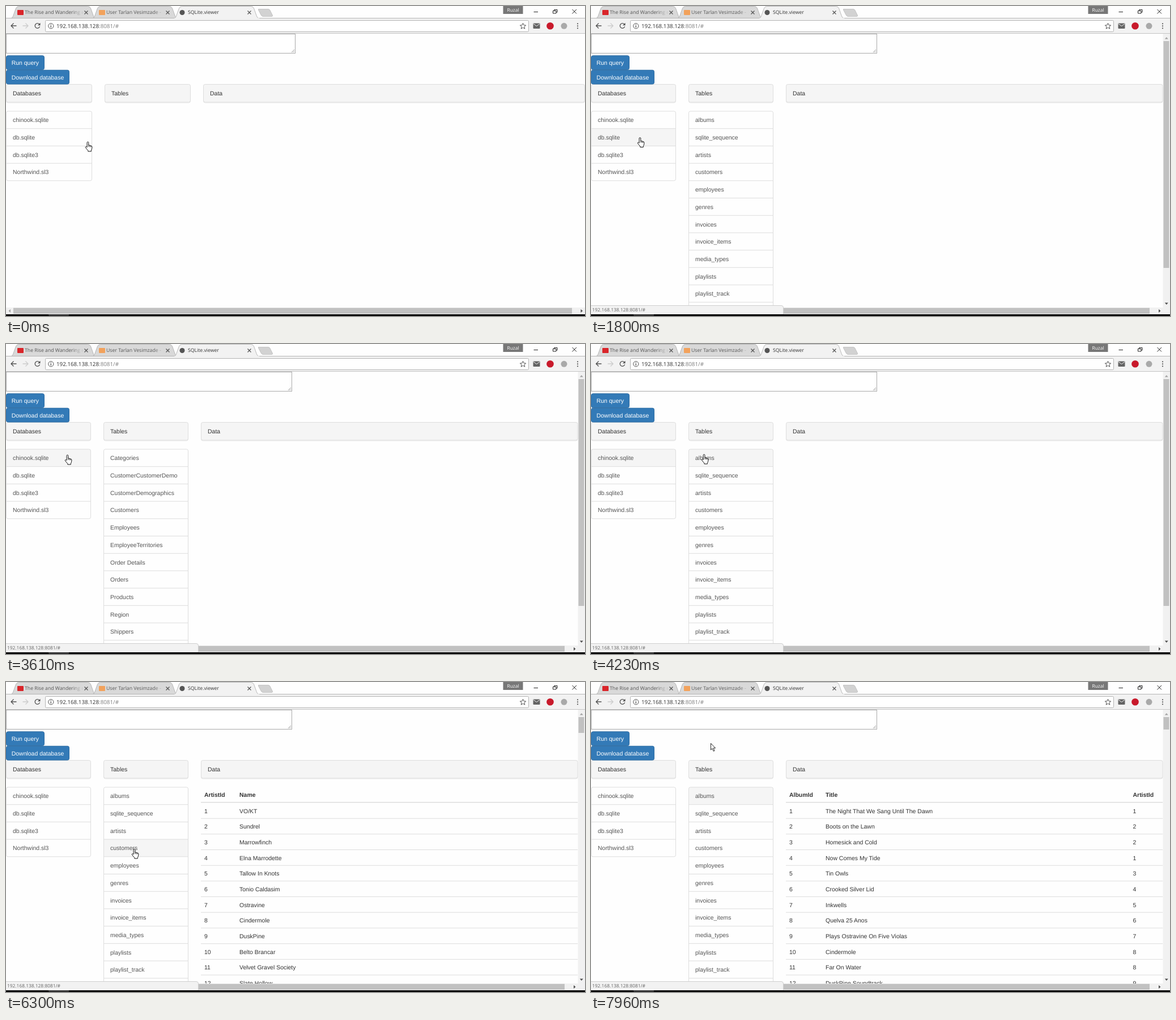
Write an HTML page that moves like this. It is 1022 by 548 pixels and loops after 8 s.

```html
<!DOCTYPE html>
<html lang="en">
<head>
<meta charset="utf-8">
<title>SQLite.viewer</title>
<style>
  html, body { margin: 0; width: 100%; height: 100%; overflow: hidden; background: #fefefe; }
  svg { display: block; }
  text { font: 10.47px "Liberation Sans", Arial, sans-serif; text-rendering: geometricPrecision; white-space: pre; }
  .ui { font-family: "Open Sans", "Noto Sans", sans-serif; font-size: 8.7px; }
  .line { fill: none; stroke: #ddd; }
  .icon { fill: none; stroke: #505050; stroke-width: 1.3; }
</style>
</head>
<body>
<svg id="stage" width="1022" height="548" viewBox="0 0 1022 548">
  <defs>
    <clipPath id="view"><rect y="49" width="1009.5" height="484"/></clipPath>
    <linearGradient id="fade"><stop stop-color="#d9d9d9" stop-opacity="0"/><stop offset="1" stop-color="#d9d9d9"/></linearGradient>
  </defs>
  <rect width="1022" height="548" fill="#fefefe"/>
  <g id="page"></g>
  <g id="bars"></g>

  <g id="bubble">
    <path d="M-1 529.5H336Q339.5 529.5 339.5 533V546H-1Z" fill="#f2f2f2" stroke="#cfcfcf"/>
    <text class="ui" x="2" y="540.4" fill="#666" style="font-size:8.4px">192.168.138.128:8081/#</text>
  </g>

  <g id="chrome">
    <rect width="1022" height="22" fill="#fefefe"/>
    <path d="M445.5 5.5H463Q465 5.5 466 7.5L470.5 16.5Q471 18.5 469 18.5H454Q451.500 18.5 450.500 16.5L445.500 7Z" fill="#d2d2d2" stroke="#b5b5b5" stroke-width=".7"/>
    <g id="tabs"></g>
    <rect y="21.500" width="1022" height="27" fill="#f2f2f2"/>
    <path d="M0 21.5H297M447 21.5H1022" stroke="#b4b4b4"/>
    <path d="M0 48.5H1022" stroke="#c4c4c4"/>
    <rect x="69.500" y="25.500" width="853" height="20" rx="2" fill="#fff" stroke="#b3b3b3"/>
    <path class="icon" d="M18.500 35H9M13.500 30.500L9 35L13.500 39.500"/>
    <path class="icon" d="M29.500 35H39M34.500 30.500L39 35L34.500 39.500" style="stroke:#ccc"/>
    <path class="icon" d="M58.800 32.200A4.300 4.300 0 1 0 59.600 36.300"/><path d="M60.500 29.800V34.200H56Z" fill="#505050"/>
    <circle class="icon" cx="79.300" cy="35.300" r="4.600" style="stroke-width:1"/>
    <path class="icon" d="M79.300 34.500V38M79.300 32.300V33.500"/>
    <text class="ui" x="89" y="38.600" fill="#333" style="font-size:9.8px">192.168.138.128<tspan fill="#808080">:8081/#</tspan></text>
    <path class="icon" style="stroke-width:1" d="M912.500 30.300l1.500 3.500 3.700.3-2.800 2.400.9 3.700-3.300-2-3.300 2 .9-3.700-2.800-2.400 3.700-.3z"/>
    <rect x="930.500" y="30.500" width="12" height="9.500" rx="1" fill="#646464"/><path d="M931 31.500L936.500 35.500L942 31.500" fill="none" stroke="#f2f2f2"/>
    <circle cx="960.500" cy="35.300" r="6.300" fill="#c8192b"/>
    <circle cx="985" cy="35.300" r="5.500" fill="#a9a9a9"/>
    <g fill="#505050"><circle cx="1009" cy="31.300" r="1.100"/><circle cx="1009" cy="35.300" r="1.100"/><circle cx="1009" cy="39.300" r="1.100"/></g>
    <rect x="877.500" width="35" height="14" fill="#777"/>
    <text class="ui" x="895" y="10" fill="#fff" text-anchor="middle" style="font-size:8.3px">Ruzal</text>
    <path d="M931.500 10.500H939M965.500 8.500H971V13H965.500ZM967.500 8.500V6.500H973V11H971M999.500 6L1007 13.500M1007 6L999.500 13.500" fill="none" stroke="#222"/>
  </g>
  <rect y="545" width="1022" height="3" fill="#000"/>
  <rect x="75" y="545" width="36" height="3" fill="#333"/>

  <g id="cursor" fill="#fff" stroke="#111" stroke-linejoin="round">
    <g id="hand" transform="translate(-4.500 -.5)">
      <path d="M3.600 10.300V2a1.300 1.300 0 0 1 2.700 0V6.500q1.200-.5 2 .5 1.200-.4 1.900.6 2.100-.1 2.200 2c0 2.800-.7 4.700-1.600 6.300v1.600H5.300v-1.500C4 14.600 2 12.300 .9 10.600c-.6-1.200.9-2 1.700-1.200z"/>
      <path d="M6.300 6.500V9.500M8.300 7V9.800M10.200 7.600V10" fill="none" stroke-width=".8"/>
    </g>
    <path id="arrow" stroke-width=".9" d="M.5.5V12L3.200 9.500 5.200 14.300 7.100 13.500 5.100 8.800H8.600Z"/>
  </g>
</svg>
<script>
const LOOP = 8000, TOP = 186, ROW = 30.7;
const $ = id => document.getElementById(id);

function add(parent, tag, attrs = {}, label) {
  const node = document.createElementNS('http://www.w3.org/2000/svg', tag);
  for (const key in attrs) node.setAttribute(key, attrs[key]);
  if (label !== undefined) node.textContent = label;
  return parent.appendChild(node);
}
const group = (parent, attrs) => add(parent, 'g', attrs);
const rect = (g, x, y, width, height, rest) => add(g, 'rect', { x, y, width, height, ...rest });
const text = (g, x, y, label, fill = '#333', rest) => add(g, 'text', { x, y, fill, ...rest }, label);
const path = (g, d, rest) => add(g, 'path', { d, ...rest });
const show = (node, on) => { node.style.display = on ? '' : 'none'; };

// Browser tabs
function tab(x, title, icon, active) {
  const g = $('tabs'), fill = active ? '#f2f2f2' : '#d9d9d9';
  path(g, `M${x} 22Q${x + 3} 21 ${x + 4} 18L${x + 9} 4Q${x + 11} .5 ${x + 14} .5H${x + 136}Q${x + 139} .5 ${x + 141} 4L${x + 146} 18Q${x + 147} 21 ${x + 150} 22`,
    { fill, stroke: '#aaa', 'stroke-width': .8 });
  if (active) add(g, 'circle', { cx: x + 14.5, cy: 11.5, r: 4.5, fill: icon });
  else rect(g, x + 11.5, 7, 11, 9, { fill: icon, rx: 1 });
  text(g, x + 24.5, 14.4, title, active ? '#333' : '#555', { class: 'ui' });
  if (!active) rect(g, x + 108, 3, 18, 16, { fill: 'url(#fade)' });
  if (!active) rect(g, x + 126, 3, 10, 16, { fill });
  path(g, `M${x + 130} 8.500l6 6m0-6l-6 6`, { stroke: '#555', 'stroke-width': 1.2 });
}
tab(8.5, 'The Rise and Wandering of', '#d9252a');
tab(152.500, 'User Tarlan Vesimzade -', '#f2a25c');
tab(296.500, 'SQLite.viewer', '#555', true);

// Page parts
const page = $('page');
const rows = { 0: [], 1: [] };

function list(g, x, width, names, col) {
  const height = names.length * ROW;
  rect(g, x + .5, TOP, width, height, { fill: '#fefefe', rx: 3 });
  names.forEach((name, i) => {
    const y = TOP + i * ROW;
    rows[col].push({ i, node: rect(g, x + .5, y, width, ROW, { rx: 2 }) });
    if (i) path(g, `M${x + .5} ${y}h${width}`, { class: 'line' });
    text(g, x + 12, y + 19.3, name, '#555');
  });
  rect(g, x + .5, TOP, width, height, { class: 'line', rx: 3 });
}

function panel(g, x, right, title) {
  rect(g, x + .5, 139.500, right - x - 1, 31.500, { fill: 'none', stroke: '#e4e4e4', rx: 3 });
  rect(g, x + .5, 138.500, right - x - 1, 31.500, { fill: '#f5f5f5', stroke: '#ddd', rx: 3 });
  text(g, x + 12, 158, title);
}

function layout(area, colWidth, tablesX, dataX, right) {
  const g = group(page);
  rect(g, .5, 49.500, area - 1, 34, { fill: '#fff', stroke: '#a9a9a9' });
  path(g, `M${area - 7} 82l5-5m-2.500 5l2.500-2.500`, { stroke: '#888', 'stroke-width': .8 });
  panel(g, 0, colWidth, 'Databases');
  panel(g, tablesX, tablesX + colWidth, 'Tables');
  panel(g, dataX, right, 'Data');
  list(g, 0, colWidth - 1, ['chinook.sqlite', 'db.sqlite', 'db.sqlite3', 'Northwind.sl3'], 0);
  return g;
}
const wide = layout(511, 152, 174, 348, 1022);
const narrow = layout(505, 150, 172, 344, 1009.5);

[['Run query', 87.500, 68], ['Download database', 113, 112]].forEach(([label, y, w]) => {
  rect(page, .5, y + .3, w - 1, 24.800, { fill: '#337ab7', stroke: '#2e6da4', rx: 3 });
  text(page, 9.7, y + 16.700, label, '#fff');
});

function tableList(names) {
  const g = group(page, { 'clip-path': 'url(#view)' });
  list(g, 172, 149, names.split(','), 1);
  return g;
}
const lists = {
  chinook: tableList('albums,sqlite_sequence,artists,customers,employees,genres,invoices,invoice_items,media_types,playlists,playlist_track,tracks'),
  north: tableList('Categories,CustomerCustomerDemo,CustomerDemographics,Customers,Employees,EmployeeTerritories,Order Details,Orders,Products,Region,Shippers,Suppliers')
};

// Cells are split by "|", lines inside a cell by "/ "
function dataTable(xs, head, body) {
  const g = group(page, { 'clip-path': 'url(#view)' });
  head.split('|').forEach((h, i) => text(g, xs[i], 203, h, '#333', { 'font-weight': 700, style: 'font-weight:700' }));
  path(g, 'M344 212.800H1009.500', { class: 'line', 'stroke-width': 1.5 });
  let y = 213.500;
  body.forEach(row => {
    let most = 1;
    row.split('|').forEach((cell, i) => {
      const parts = cell.split('/ ');
      most = Math.max(most, parts.length);
      parts.forEach((s, n) => text(g, xs[i], y + 18 + n * 14.97, s));
    });
    y += 12.710 + most * 14.97;
    path(g, `M344 ${y}H1009.500`, { class: 'line' });
  });
  return g;
}
const numbered = (names, after = []) =>
  names.split(',').map((n, i) => `${i + 1}|${n}` + (after[i] ? '|' + after[i] : ''));

const tables = {
  albums: dataTable([350, 414, 956.5], 'AlbumId|Title|ArtistId', numbered(
    'The Night That We Sang Until The Dawn,Boots on the Lawn,Homesick and Cold,Now Comes My Tide,Tin Owls,Crooked Silver Lid,Inkwells,Quelva 25 Anos,Plays Ostravine On Five Violas,Cindermole,Far On Water,DuskPine Soundtrack',
    [1, 2, 2, 1, 3, 4, 5, 6, 7, 8, 8, 9])),
  artists: dataTable([350, 412], 'ArtistId|Name', numbered(
    'VO/KT,Sundrel,Marrowfinch,Elna Marrodette,Tallow In Knots,Tonio Caldasim,Ostravine,Cindermole,DuskPine,Belto Brancar,Velvet Gravel Society,Slate Hollow')),
  customers: dataTable([350, 420.5, 484, 558, 626, 722, 795, 836.5, 905, 975.5],
    'CustomerId|FirstName|LastName|Company|Address|City|State|Country|PostalCode|Phone', [
    '1|Túlo|Marveiros|Jatuvi -/ Empresa/ Brasileira/ de/ Ferramentas/ S.A.|Av. Comandante/ Brisa Alta, 1846|São José/ dos Campos|SP|Brazil|13480-000|+55 (17/ 4016-/ 8832',
    '2|Mirela|Dünkel||Lindner-Kroll-/ Straße 52|Stuttgart||Germany|70918|+49 03/ 619407',
    '3|Aurélien|Vautrelle||2760 rue/ Valombre|Montréal|QC|Canada|H6K 3B9|+1 (529/ 640-83',
    '4|Tørik|Lofsen||Skogfalveien 38/ |Oslo||Norway|0836|+47 61/ 30 58',
    '5|Bohudar|Dolenkovská|KovoLinka/ s.r.o.|Trnova 4/718|Prague||Czech/ Republic|16200|+420 7/ 3068/ 1194/ ',
    '6|Jitava|Krůn||Lesní 2058/3|Prague||Czech/ Republic|15800|+420 7'])
};

// Scrollbars
const bars = $('bars');
rect(bars, 0, 533, 1022, 12, { fill: '#f1f1f1' });
path(bars, 'M8 536v6l-3.500-3z', { fill: '#a3a3a3' });
const hThumb = rect(bars, 13, 533.700, 986, 10.300, { fill: '#c1c1c1' });
const hArrow = path(bars, 'M1014.500 536v6l3.500-3z', { fill: '#505050' });
const vBar = group(bars);
rect(vBar, 1009.5, 49, 12.5, 484, { fill: '#f1f1f1' });
path(vBar, 'M1012.800 58.500h6l-3-3.500z', { fill: '#a3a3a3' });
path(vBar, 'M1012.800 524.500h6l-3 3.500z', { fill: '#505050' });
const vThumb = rect(vBar, 1010.5, 62, 10, 401, { fill: '#c1c1c1' });
const thumbEnd = { albums: 84, artists: 90, customers: 131 };

// Timeline: [ms, table list, data table]
const views = [
  [0], [1070, 'chinook'], [2000], [2920, 'north'], [3760], [3800, 'chinook'],
  [4880, 'chinook', 'albums'], [5730, 'chinook'], [5770, 'chinook', 'artists'],
  [6500, 'chinook'], [6530, 'chinook', 'customers'], [7760, 'chinook'], [7800, 'chinook', 'albums']
];
// [ms, column, row]
const focus = [
  [0, -1, -1], [800, 0, 0], [1800, 0, 1], [2730, 0, 3], [3610, 0, 0],
  [4610, 1, 0], [5530, 1, 2], [6300, 1, 3], [7570, 1, 0]
];
// [ms, x, y] of the pointer tip
const moves = [
  [0, 144, 240], [30, 144, 240], [340, 95, 196], [1160, 95, 196], [1530, 86, 232.500],
  [2120, 86, 232.500], [2500, 85.500, 292.500], [2960, 85.500, 292.500], [3340, 108, 196],
  [3930, 108, 196], [4230, 199, 195], [4340, 206, 197], [4960, 206, 197],
  [5260, 223, 273], [5800, 223, 273], [6000, 226, 295], [6780, 226, 295],
  [7110, 236, 206], [7260, 238, 203], [7760, 238, 203], [7960, 211, 108]
];
const latest = (list, t) => list.filter(e => e[0] <= t).pop();

function pointer(t) {
  const i = moves.findIndex(m => m[0] > t);
  if (i < 0) return moves[moves.length - 1].slice(1);
  const [t0, x0, y0] = moves[i - 1], [t1, x1, y1] = moves[i];
  const k = Math.sin((t - t0) / (t1 - t0) * Math.PI / 2);
  return [x0 + (x1 - x0) * k, y0 + (y1 - y0) * k];
}

function draw(t) {
  const [, tableSet, data] = latest(views, t);
  const [, focusCol, focusRow] = latest(focus, t);
  show(wide, !tableSet);
  show(narrow, tableSet);
  show(vBar, tableSet);
  for (const k in lists) show(lists[k], k === tableSet);
  for (const k in tables) show(tables[k], k === data);
  vThumb.setAttribute('height', (thumbEnd[data] || 463) - 62);
  hThumb.setAttribute('width', (data === 'customers' ? 774 : tableSet ? 986 : 999) - 13);
  hArrow.setAttribute('transform', `translate(${tableSet ? -12.5 : 0})`);

  const [x, y] = pointer(t);
  const col = x < 151 ? 0 : x > 172 && x < 322 && tableSet ? 1 : -1;
  const over = y >= TOP && col >= 0 ? Math.floor((y - TOP) / ROW) : -1;
  for (const c of [0, 1]) for (const { i, node } of rows[c]) {
    const lit = (t >= 30 && c === col && i === over) || (c === focusCol && i === focusRow);
    node.setAttribute('fill', lit ? '#f5f5f5' : '#fefefe');
  }
  $('cursor').setAttribute('transform', `translate(${x.toFixed(1)} ${y.toFixed(1)})`);
  show($('hand'), over >= 0);
  show($('arrow'), over < 0);
  $('bubble').style.opacity = Math.min(1, Math.max(0, (t - 470) / 100));
}

const start = performance.now();
function tick() {
  draw((performance.now() - start) % LOOP);
  requestAnimationFrame(tick);
}
tick();
</script>
</body>
</html>
```
